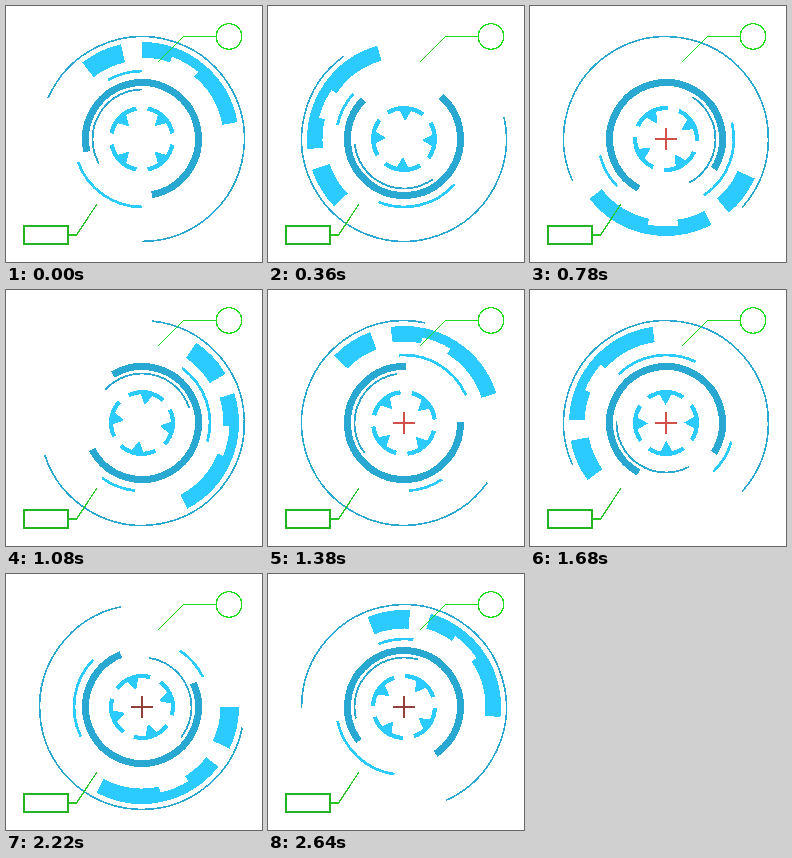
An HTML page for the animation above (2.7 s loop, 256 by 256 pixels).

```html
<!DOCTYPE html>
<html lang="en">
<head>
<meta charset="utf-8">
<title>HUD dial</title>
<style>
html, body { margin: 0; width: 100%; height: 100%; overflow: hidden; background: #fff; }
svg { display: block; width: 100vw; height: 100vh; shape-rendering: crispEdges; }
</style>
</head>
<body>
<svg viewBox="0 0 256 256" fill="none">
  <g id="dial" transform="translate(136 133)"></g>
  <path id="cross" d="M-11 0H11M0-11V11" transform="translate(136 133)" stroke-width="2"/>
  <g stroke="#1fdc1f" stroke-width="1.3">
    <circle cx="223" cy="30.5" r="12.8"/>
    <path d="M151.5 56.5L177.5 30.5H210"/>
    <path d="M62 229H70.5L91 198" stroke="#28c428"/>
    <rect x="18" y="220" width="44" height="18" stroke="#22b422" stroke-width="1.8"/>
  </g>
</svg>
<script>
const STEP = 60, STEPS = 45;
const BRIGHT = '#2bcbff', DEEP = '#29a9d1';
const dial = document.getElementById('dial');
const cross = document.getElementById('cross');

function add(parent, name, attrs) {
  const el = document.createElementNS('http://www.w3.org/2000/svg', name);
  for (const key in attrs) el.setAttribute(key, attrs[key]);
  return parent.appendChild(el);
}

// Clockwise arc band between two radii, angles in degrees from east.
function band(parent, inner, outer, from, to, color) {
  const r = (inner + outer) / 2;
  const at = deg => {
    const a = deg * Math.PI / 180;
    return `${(r * Math.cos(a)).toFixed(3)} ${(r * Math.sin(a)).toFixed(3)}`;
  };
  const large = to - from > 180 ? 1 : 0;
  add(parent, 'path', {
    d: `M${at(from)}A${r} ${r} 0 ${large} 1 ${at(to)}`,
    stroke: color, 'stroke-width': outer - inner
  });
}

const rings = [];
// turns: whole revolutions per loop, clockwise when positive.
function ring(turns) {
  const el = add(dial, 'g', {});
  rings.push({ el, turns });
  return el;
}

band(ring(3), 101.6, 103.2, 203.6, 450, DEEP);

const blocks = ring(-2);
band(blocks, 78.5, 97, 232, 257.5, BRIGHT);
band(blocks, 81.5, 97, 270, 290, BRIGHT);
band(blocks, 87.5, 97, 289.5, 310.5, BRIGHT);
band(blocks, 81.5, 97, 310, 350, BRIGHT);

const pair = ring(-1);
band(pair, 66.6, 69.3, 90, 160, BRIGHT);
band(pair, 66.6, 69.3, 240, 270, BRIGHT);

band(ring(3), 53, 60, 167, 440, DEEP);
band(ring(-2), 48.6, 50.4, 150.5, 270, DEEP);

const core = ring(1);
for (let a = 45; a < 360; a += 90) {
  band(core, 28.8, 33, a - 34.5, a + 34.5, BRIGHT);
  add(core, 'path', { d: 'M18 0L29.5-6.5V6.5Z', fill: BRIGHT, transform: `rotate(${a})` });
}

function draw(now) {
  const step = Math.floor(now / STEP) % STEPS;
  for (const { el, turns } of rings) {
    el.setAttribute('transform', `rotate(${turns * 360 * step / STEPS})`);
  }
  // The cross blinks three times per loop, darker at both ends.
  const beat = step % 15;
  cross.style.display = beat < 7 ? 'none' : '';
  cross.setAttribute('stroke', beat === 7 || beat === 14 ? '#93403c' : '#d2504a');
}

let start;
function tick(now) {
  start ??= now;
  draw(now - start);
  requestAnimationFrame(tick);
}
draw(0);
requestAnimationFrame(tick);
</script>
</body>
</html>
```
